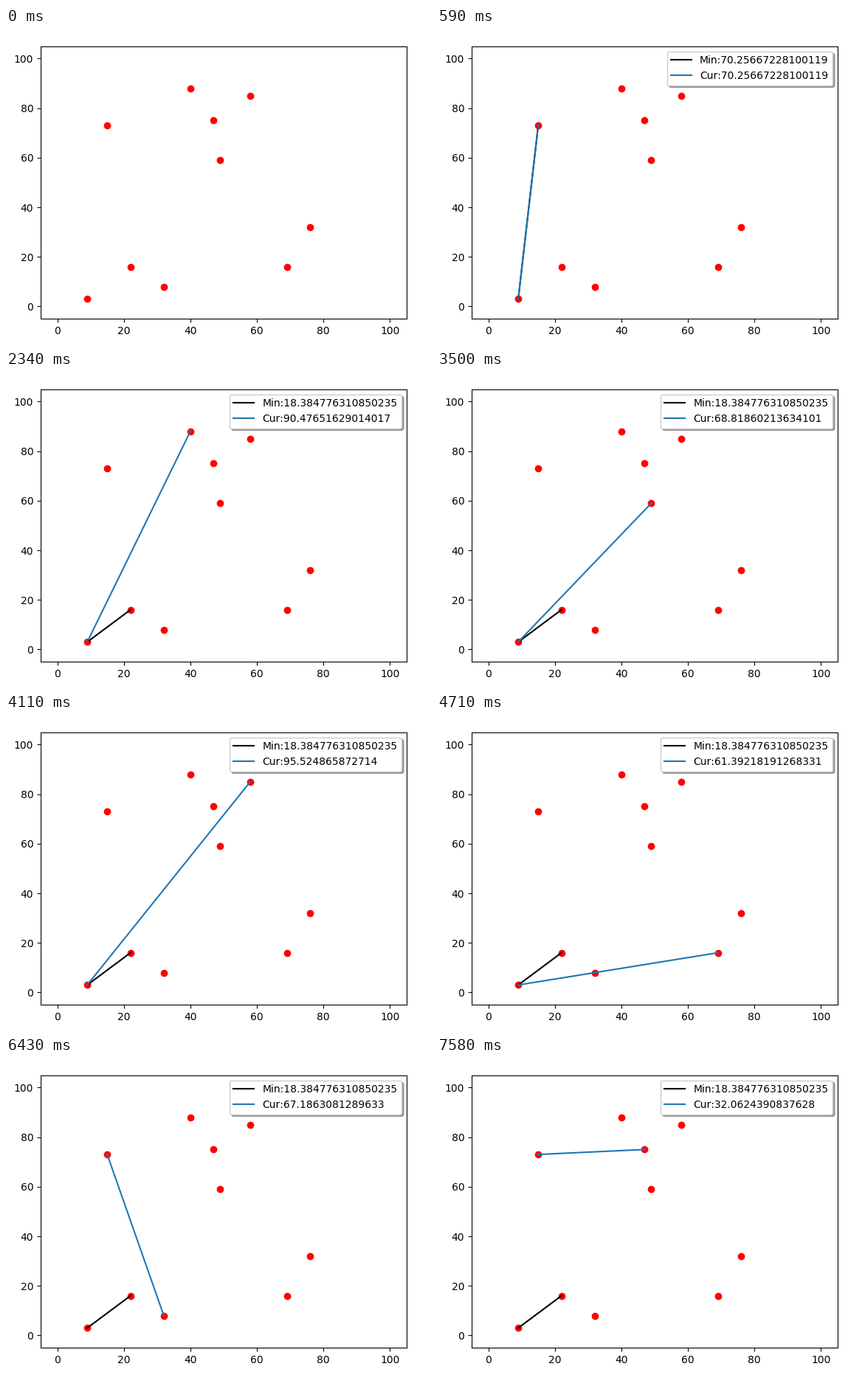
Recreate the animation shown at these times as a matplotlib script. Size 576 by 427 pixels, loop 8000 ms.

```python
import math
from itertools import combinations

import matplotlib.pyplot as plt
from matplotlib.animation import FuncAnimation

W, H, DPI = 576, 427, 100
LOOP, STEP = 8000, 25
FIRST, PERIOD = 590, 582.5  # ms until the first pair, then between pairs

POINTS = [(9, 3), (15, 73), (22, 16), (32, 8), (40, 88),
          (47, 75), (49, 59), (58, 85), (69, 16), (76, 32)]
PAIRS = list(combinations(POINTS, 2))


def dist(pair):
    (x0, y0), (x1, y1) = pair
    return math.sqrt((x1 - x0) ** 2 + (y1 - y0) ** 2)


plt.rcParams["text.kerning_factor"] = 6  # whole-pixel glyph spacing

# The small surplus keeps the pixel height from rounding down
fig = plt.figure(figsize=(W / DPI, H / DPI + 1e-5), dpi=DPI)
ax = fig.add_axes([47 / W, 32.8 / H, 496 / W, 369.6 / H])
ax.set_xlim(-5, 105)
ax.set_ylim(-5, 105)
ax.plot(*zip(*POINTS), "ro")
min_line, = ax.plot([], [], color="black")
cur_line, = ax.plot([], [], color="C0")


def show(line, name, pair):
    line.set_data(*zip(*pair))
    line.set_label(f"{name}:{dist(pair)}")


def update(frame):
    now = (frame + 1) * STEP - 1
    count = max(0, math.floor((now - FIRST) / PERIOD) + 1)
    seen = PAIRS[:count]
    if seen:
        show(min_line, "Min", min(seen, key=dist))
        show(cur_line, "Cur", seen[-1])
        ax.legend(handles=[min_line, cur_line], loc="upper right", shadow=True)
    else:
        min_line.set_data([], [])
        cur_line.set_data([], [])
        if ax.get_legend():
            ax.get_legend().remove()
    return min_line, cur_line


anim = FuncAnimation(fig, update, frames=LOOP // STEP, interval=STEP,
                     init_func=lambda: update(0), repeat=True, repeat_delay=0)
plt.show()
```
